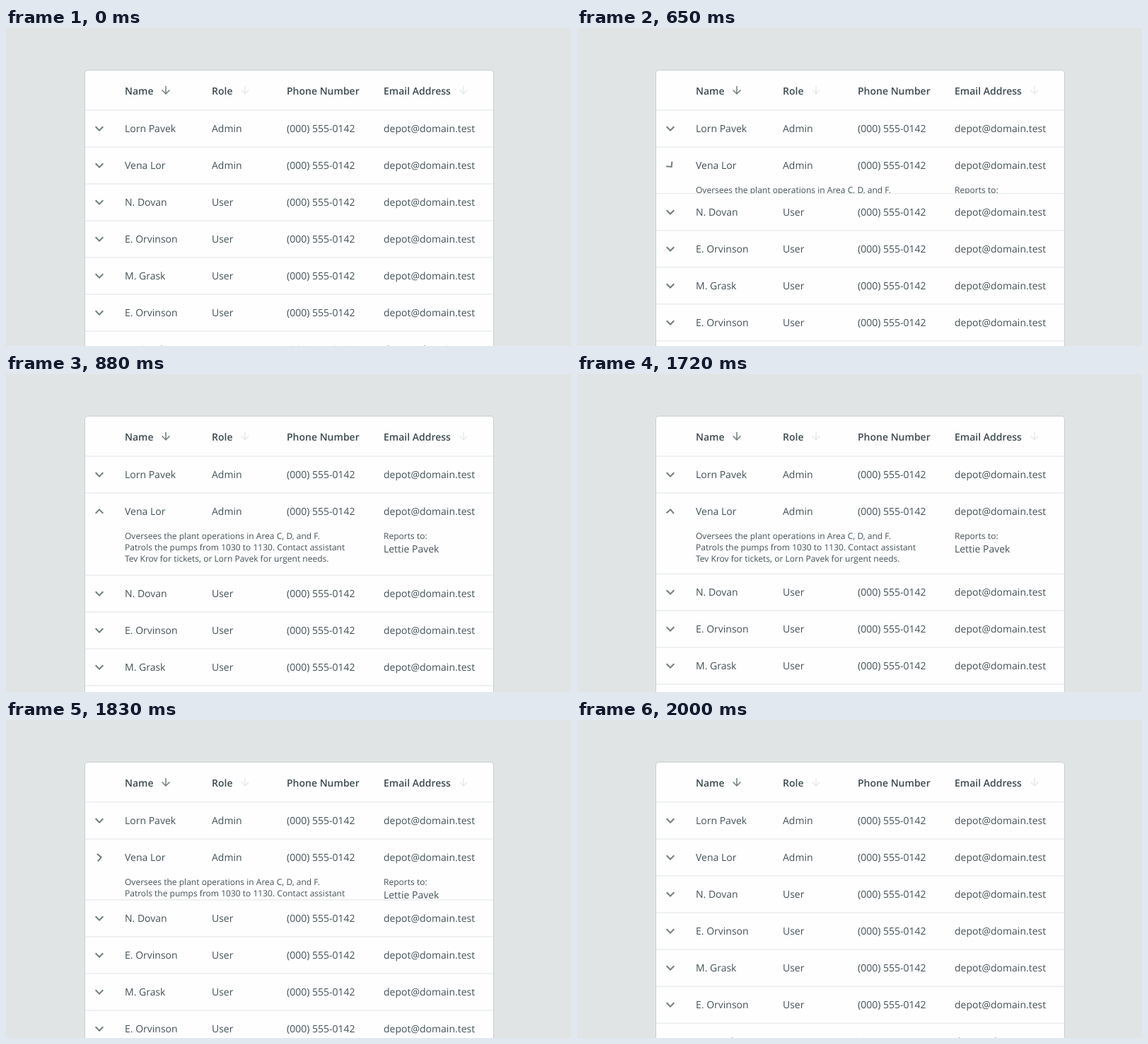
These frames come from a looping animation (799 px wide and 449 px high, 2420 ms). An HTML page:

```html
<!DOCTYPE html>
<html lang="en">
<head>
<meta charset="utf-8">
<title>Expanding table row</title>
<style>
  @property --open { syntax: "<number>"; inherits: true; initial-value: 0; }

  html, body { margin: 0; width: 100%; height: 100%; overflow: hidden; background: #e0e4e5; }
  svg {
    display: block; width: 100vw; height: 100vh;
    font: 14px "Open Sans", sans-serif;
    text-rendering: geometricPrecision;
    fill: #435156;
    animation: toggle 2420ms step-end infinite;
  }
  .card { fill: #fefefe; stroke: #c9cecf; }
  .cover { fill: #fefefe; }
  .rule { stroke: #e0e4e5; }
  .head { font-weight: 600; fill: #3c4a4f; }
  .small { font-size: 12px; letter-spacing: .02px; }
  .icon { fill: #717d7d; }
  .faint { fill: #e7eaea; }

  .below { transform: translateY(calc(var(--open) * 64px)); }
  .turn { transform-origin: 132px 194px; transform: rotate(calc(var(--open) * -180deg)); }

  /* ease-in-out over 300 ms, held at about 18 steps per second */
  @keyframes toggle {
    0%      { --open: 0; }
    24.38%  { --open: .031; }
    26.86%  { --open: .217; }
    29.34%  { --open: .53; }
    31.405% { --open: .822; }
    33.884% { --open: .976; }
    36.363% { --open: 1; }
    71.074% { --open: .969; }
    73.14%  { --open: .822; }
    75.619% { --open: .531; }
    78.099% { --open: .22; }
    80.578% { --open: .034; }
    82.644%, 100% { --open: 0; }
  }
</style>
</head>
<body>
<svg id="stage" viewBox="0 0 799 449">
  <defs>
    <path id="chevron" d="M-4.59-3.41 0 1.17 4.59-3.41 6-2 0 4-6-2z"/>
    <path id="arrow" transform="scale(.75)" d="M8 0 6.59-1.41 1 4.17V-8H-1V4.17L-6.58-1.42-8 0 0 8z"/>
  </defs>
  <rect class="card" x="111.5" y="59.5" width="578" height="420" rx="4.5"/>
  <g class="head">
    <text x="168" y="94">Name</text>
    <text x="291" y="94">Role</text>
    <text x="397" y="94">Phone Number</text>
    <text x="534" y="94">Email Address</text>
  </g>
  <use class="icon" href="#arrow" x="226" y="88"/>
  <use class="faint" href="#arrow" x="338" y="88"/>
  <use class="faint" href="#arrow" x="647" y="88"/>
  <g id="above"></g>
  <g class="small">
    <text x="168" y="233">Oversees the plant operations in Area C, D, and F.</text>
    <text x="168" y="249">Patrols the pumps from 1030 to 1130. Contact assistant</text>
    <text x="168" y="265">Tev Krov for tickets, or Lorn Pavek for urgent needs.</text>
    <text x="534" y="233">Reports to:</text>
  </g>
  <text x="534" y="252">Lettie Pavek</text>
  <g class="below">
    <rect class="cover" x="112" y="220" width="577" height="300"/>
    <g id="rest"></g>
  </g>
</svg>
<script>
  const people = [
    ["Lorn Pavek", "Admin"],
    ["Vena Lor", "Admin"],
    ["N. Dovan", "User"],
    ["E. Orvinson", "User"],
    ["M. Grask", "User"],
    ["E. Orvinson", "User"],
    ["M. Grask", "User"],
  ];
  const columns = [168, 291, 397, 534];
  const rowHeight = 52, firstRow = 116, expanded = 1;

  const row = ([name, role], i) => {
    const top = firstRow + i * rowHeight;
    const cells = [name, role, "(000) 555-0142", "depot@domain.test"];
    return `<path class="rule" d="M112 ${top}H689"/>
      <g class="${i === expanded ? "turn" : ""}">
        <use class="icon" href="#chevron" x="132" y="${top + 26}"/>
      </g>` +
      cells.map((cell, c) => `<text x="${columns[c]}" y="${top + 31}">${cell}</text>`).join("");
  };

  const rows = people.map(row);
  document.getElementById("above").innerHTML = rows.slice(0, expanded + 1).join("");
  document.getElementById("rest").innerHTML = rows.slice(expanded + 1).join("");
</script>
</body>
</html>
```
